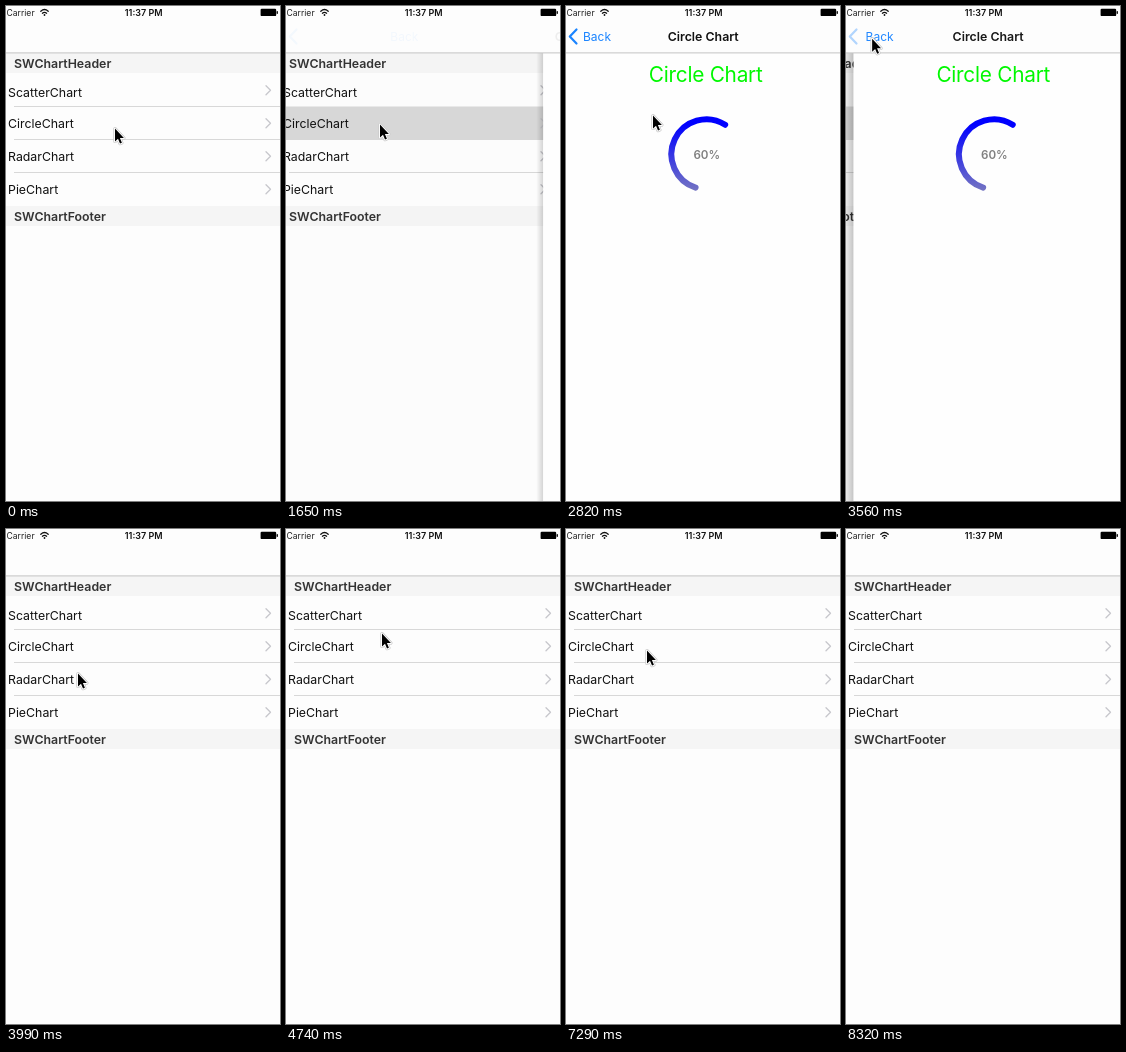
An HTML page for the animation above (8.51 s loop, 274x495 px).

```html
<!DOCTYPE html>
<html lang="en">
<head>
<meta charset="utf-8">
<title>Chart list</title>
<style>
  html, body { margin: 0; width: 100%; height: 100%; overflow: hidden; background: #fdfdfd; }
  svg { display: block; width: 100vw; height: 100vh; font: 12.35px Inter, "Open Sans", sans-serif; }
  .bold { font-weight: 600; }
  .mid { text-anchor: middle; }
  .line { fill: none; stroke-linecap: round; stroke-linejoin: round; }
</style>
</head>
<body>
<svg viewBox="0 0 274 495">
  <defs>
    <linearGradient id="ink" gradientUnits="userSpaceOnUse" x1="0" y1="111" x2="0" y2="187">
      <stop offset=".1" stop-color="#0000ff"/>
      <stop offset="1" stop-color="#7878c0"/>
    </linearGradient>
    <linearGradient id="shade">
      <stop offset="0" stop-opacity="0"/>
      <stop offset="1" stop-opacity=".16"/>
    </linearGradient>
  </defs>

  <rect width="274" height="495" fill="#fdfdfd"/>
  <g id="list"></g>
  <rect id="dim" y="47" width="274" height="448"/>

  <g id="page">
    <rect x="-7" y="47" width="7" height="448" fill="url(#shade)"/>
    <rect y="47" width="274" height="448" fill="#fefefe"/>
    <text class="mid" x="139.7" y="76" font-size="20.8" letter-spacing="-.25" fill="#00f800">Circle Chart</text>
    <text class="bold mid" x="140.8" y="153" font-size="11.6" fill="#808080">60%</text>
    <path id="arc" class="line" stroke="url(#ink)" stroke-width="6"/>
  </g>

  <rect width="274" height="46.4" fill="#fdfdfd"/>
  <rect y="46.4" width="274" height="1" fill="#c4c4c4"/>
  <path id="chevron" class="line" d="M10.5 23.5L3.8 30.5L10.5 37.5" stroke="#1a84ff" stroke-width="2.2"/>
  <text id="back" y="34.6" font-size="12" fill="#1a84ff">Back</text>
  <text id="title" class="bold mid" y="34.6" fill="#111">Circle Chart</text>

  <text x="0.5" y="9.7" font-size="8.6" fill="#222">Carrier</text>
  <g class="line" stroke="#111" stroke-width="1.3">
    <path d="M34.8 5.2Q38.5 1.9 42.2 5.2M36.4 7.2Q38.5 5.4 40.6 7.2"/>
    <path d="M38.5 9v.1" stroke-width="1.8"/>
  </g>
  <text class="bold mid" x="137.7" y="9.8" font-size="9" fill="#111">11:37 PM</text>
  <rect x="254.6" y="2.8" width="15.6" height="7.3" rx="1.2"/>
  <rect x="270.6" y="5.1" width="1.3" height="2.8" rx=".6"/>

  <g id="cursor" stroke-linejoin="round">
    <path id="arrow" d="M1 1.5V14.6L4 11.8L6 16.6L7.9 15.8L5.9 11.1H9.9Z" stroke="#ccc" stroke-width="3" paint-order="stroke"/>
    <use href="#arrow" style="stroke: #fff"/>
    <path d="M1 1.5V14.6L4 11.8L6 16.6L7.9 15.8L5.9 11.1H9.9Z" stroke="#fff" stroke-width="1.8" paint-order="stroke"/>
  </g>
</svg>
<script>
const $ = id => document.getElementById(id);
const LOOP = 8510, STEP = 147, PUSH = 1632.5, POP = 3544.5;
const clamp = v => Math.min(1, Math.max(0, v));

// The screen only refreshes in bursts; the pointer passes evenly timed stops in each
const bursts = [
  { from: 0, to: 0, stops: [[108, 121]] },
  { from: 750, to: 1050, stops: [[103, 120], [93, 117]] },
  { from: 1650, to: 2680, stops: [[93, 117]] },
  { from: 2820, to: 3850, stops: [[86, 108], [48, 58], [26, 32], [25, 31], [48, 92]] },
  { from: 3990, to: 4740, stops: [[71, 143], [95, 103]] },
  { from: 6390, to: 7290, stops: [[85, 126], [64, 136], [80, 120]] },
  { from: 7440, to: 8320, stops: [[75, 138], [53, 335], [240, 500]] }
];

function buildList() {
  const band = (y, name) =>
    `<rect x="-10" y="${y}" width="290" height="20" fill="#f5f5f5"/>
     <text class="bold" x="8" y="${y + 15}" fill="#333">${name}</text>`;
  const row = (name, i) => {
    const y = 84 + 33 * i;
    return `<text x="2" y="${i ? y + 4.6 : 90.6}" fill="#111">${name}</text>
      <path class="line" d="M260 ${y - 4.3}l4.5 4.5l-4.5 4.5" stroke="#c7c7cc" stroke-width="1.3"/>`;
  };
  const rule = i => `<rect class="rule" x="8" y="${100 + 33 * i}" width="266" height="1" fill="#d8d8d8"/>`;
  $('list').innerHTML = [0, 1, 2].map(rule).join('') +
    '<rect id="glow" y="100.5" width="274" height="33.5" fill="#d8d8d8"/>' +
    ['ScatterChart', 'CircleChart', 'RadarChart', 'PieChart'].map(row).join('') +
    band(47, 'SWChartHeader') + band(200, 'SWChartFooter');
}

const spring = ms => {
  const x = Math.max(0, ms) * .0228;
  return 1 - (1 + x) * Math.exp(-x);
};

// Refresh time for clock time t, and the pointer's place then
function refresh(t) {
  const { from, to, stops } = bursts.findLast(b => b.from <= t);
  const n = Math.round((to - from) / STEP) || 1;
  const f = Math.min(n, Math.floor((t - from + 5) * n / (to - from || LOOP))) / n;
  const pos = f * (stops.length - 1), i = Math.floor(pos);
  const a = stops[i], b = stops[i + 1] || a;
  return { time: from + f * (to - from), spot: a.map((v, k) => v + (b[k] - v) * (pos - i)) };
}

function arc(f) {
  const start = .6 * Math.PI, end = start + f * .6 * 1.8 * Math.PI;
  const at = a => `${140.4 + 35 * Math.cos(a)} ${148.3 + 35 * Math.sin(a)}`;
  return `M${at(start)}A35 35 0 ${end - start > Math.PI ? 1 : 0} 1 ${at(end)}`;
}

function slide(id, x, y = 0) { $(id).setAttribute('transform', `translate(${x} ${y})`); }
function fade(id, a) { $(id).setAttribute('opacity', a); }

function draw({ time: t, spot }) {
  const open = t >= 1650 && t < 3990;
  const p = open ? spring(t - PUSH) - spring(t - POP) : 0;
  const leaving = t > POP;
  const left = 1 - clamp((t - POP) / 350);
  const bar = !open ? 0 : leaving ? left : clamp((t - PUSH) / 400);

  slide('list', -82 * p);
  slide('page', 274 * (1 - p));
  fade('page', open ? 1 : 0);
  fade('dim', .08 * p);
  fade('glow', open ? left : 0);
  document.querySelectorAll('.rule').forEach((r, i) => r.setAttribute('opacity', open && i < 2 ? 1 - left : 1));

  slide('back', 17 + 93 * (1 - p));
  slide('title', 137.2 + 178 * (1 - p));
  fade('back', bar);
  fade('title', leaving ? bar : p);
  fade('chevron', leaving ? bar * .35 : bar);

  const f = clamp((t - 1650) / 1000);
  $('arc').setAttribute('d', arc(.5 - .5 * Math.cos(Math.PI * f)));

  slide('cursor', ...spot);
  fade('cursor', t < 8320 ? 1 : 0);
}

buildList();
const begin = performance.now();
function run() {
  draw(refresh((performance.now() - begin) % LOOP));
  requestAnimationFrame(run);
}
run();
</script>
</body>
</html>
```
